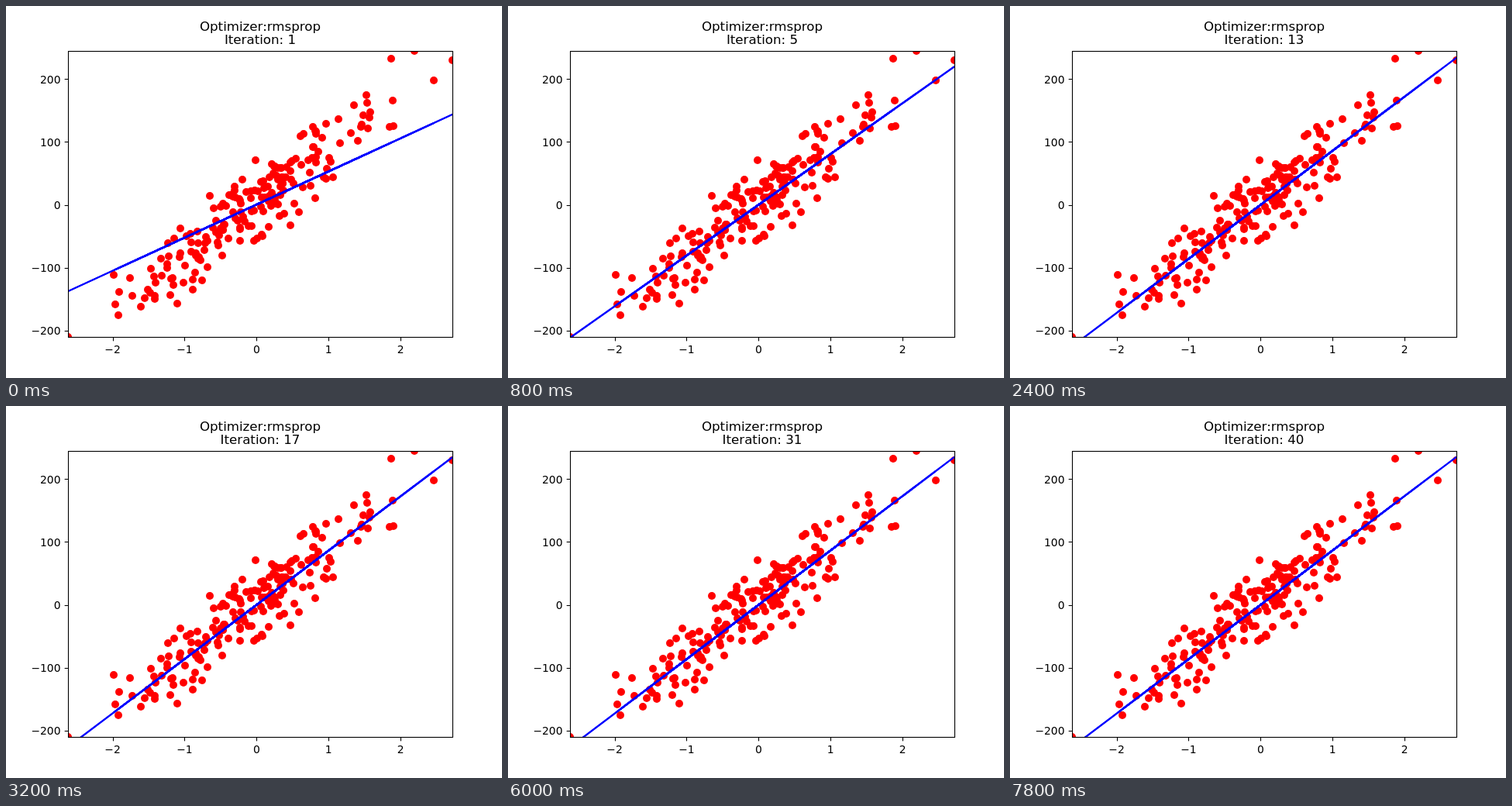
Write an HTML page that moves like this. It is 640x480 px and loops after 8 s.

```html
<!DOCTYPE html>
<html lang="en">
<head>
<meta charset="utf-8">
<title>Linear regression fit</title>
<style>
  html, body { margin: 0; width: 100%; height: 100%; overflow: hidden; background: #fff; }
  svg { display: block; width: 640px; height: 480px; }
  text { font: 13.89px "DejaVu Sans", sans-serif; }
  .title { font-size: 16.67px; text-anchor: middle; }
  .x-label { text-anchor: middle; }
  .y-label { text-anchor: end; }
  .axes { fill: none; stroke: #000; stroke-width: 1.11; }
  .fit { stroke: #00f; stroke-width: 2.08; }
  .dots { fill: #f00; }
</style>
</head>
<body>
<svg viewBox="0 0 640 480">
  <clipPath id="plot"><rect x="80" y="58" width="496" height="369"/></clipPath>
  <g clip-path="url(#plot)">
    <g class="dots"></g>
    <g class="fit"></g>
  </g>
  <g class="axes"><rect x="80.5" y="58.5" width="496" height="369"/></g>
  <g class="labels"></g>
  <text class="title" x="328" y="32">Optimizer:rmsprop</text>
  <text class="title" id="counter" x="328" y="49">Iteration: 1</text>
</svg>
<script>
const STEP_MS = 200;
const STEPS = 40;
const BOX = { left: 80, right: 576, top: 57.6, bottom: 427.2 };

// Mersenne Twister (MT19937) giving doubles in [0, 1)
function mersenneTwister(seed) {
  const size = 624;
  const state = new Uint32Array(size);
  state[0] = seed;
  for (let i = 1; i < size; i++) {
    const prev = state[i - 1];
    state[i] = Math.imul(1812433253, prev ^ (prev >>> 30)) + i;
  }
  let index = size;

  function twist() {
    for (let i = 0; i < size; i++) {
      const y = (state[i] & 0x80000000) | (state[(i + 1) % size] & 0x7fffffff);
      state[i] = state[(i + 397) % size] ^ (y >>> 1) ^ (y & 1 ? 0x9908b0df : 0);
    }
    index = 0;
  }

  function nextInt() {
    if (index === size) twist();
    let y = state[index++];
    y ^= y >>> 11;
    y ^= (y << 7) & 0x9d2c5680;
    y ^= (y << 15) & 0xefc60000;
    y ^= y >>> 18;
    return y >>> 0;
  }

  return () => {
    const high = nextInt() >>> 5;
    const low = nextInt() >>> 6;
    return (high * 67108864 + low) / 9007199254740992;
  };
}

// Polar method; count must be even
function normals(random, count) {
  const values = [];
  while (values.length < count) {
    const a = 2 * random() - 1;
    const b = 2 * random() - 1;
    const r2 = a * a + b * b;
    if (r2 >= 1 || r2 === 0) continue;
    const f = Math.sqrt(-2 * Math.log(r2) / r2);
    values.push(f * b, f * a);
  }
  return values;
}

function linearScale(values, from, to) {
  const min = Math.min(...values);
  const max = Math.max(...values);
  return v => from + (v - min) / (max - min) * (to - from);
}

function add(parent, tag, attributes, text = "") {
  const node = document.createElementNS("http://www.w3.org/2000/svg", tag);
  for (const name in attributes) node.setAttribute(name, attributes[name]);
  node.textContent = text;
  return parent.appendChild(node);
}

const find = selector => document.querySelector(selector);

// Noisy linear data
const random = mersenneTwister(42);
const xs = normals(random, 200);
const trueSlope = 100 * random();
const noise = normals(random, 200);
const ys = xs.map((x, i) => trueSlope * x + 30 * noise[i]);
const toX = linearScale(xs, BOX.left, BOX.right);
const toY = linearScale(ys, BOX.bottom, BOX.top);

xs.forEach((x, i) => add(find(".dots"), "circle", {
  cx: Math.round(toX(x)), cy: Math.round(toY(ys[i])), r: 5
}));

// Ticks and their labels
const minus = n => String(n).replace("-", "\u2212");
for (const v of [-2, -1, 0, 1, 2]) {
  const x = Math.round(toX(v)) + 0.5;
  add(find(".axes"), "path", { d: `M${x} 427.5v4.86` });
  add(find(".labels"), "text", { class: "x-label", x: toX(v), y: 448 }, minus(v));
}
for (const v of [-200, -100, 0, 100, 200]) {
  const y = Math.round(toY(v)) + 0.5;
  add(find(".axes"), "path", { d: `M80.5 ${y}h-4.86` });
  add(find(".labels"), "text", { class: "y-label", x: 70.5, y: Math.round(toY(v) + 5.2) }, minus(v));
}

// The fit runs back and forth through the unsorted samples
const segments = xs.slice(1).map((x, i) => ({
  from: xs[i],
  to: x,
  node: add(find(".fit"), "line", { x1: toX(xs[i]), x2: toX(x) })
}));

// Slope error shrinks quickly at first, then more slowly
const slopeAt = n => 86.5 - 27.5 * 0.58 ** n - 6.3 * 0.8 ** n;
const interceptAt = n => 0.4 * 0.7 ** n;

function showStep(n) {
  const predict = x => toY(slopeAt(n) * x + interceptAt(n));
  for (const { from, to, node } of segments) {
    node.setAttribute("y1", predict(from));
    node.setAttribute("y2", predict(to));
  }
  find("#counter").textContent = `Iteration: ${n + 1}`;
}

let shown = 0;
showStep(shown);
const start = performance.now();

function tick() {
  const elapsed = Math.max(0, performance.now() - start);
  const step = Math.floor(elapsed / STEP_MS) % STEPS;
  if (step !== shown) showStep(shown = step);
  requestAnimationFrame(tick);
}
requestAnimationFrame(tick);
</script>
</body>
</html>
```
